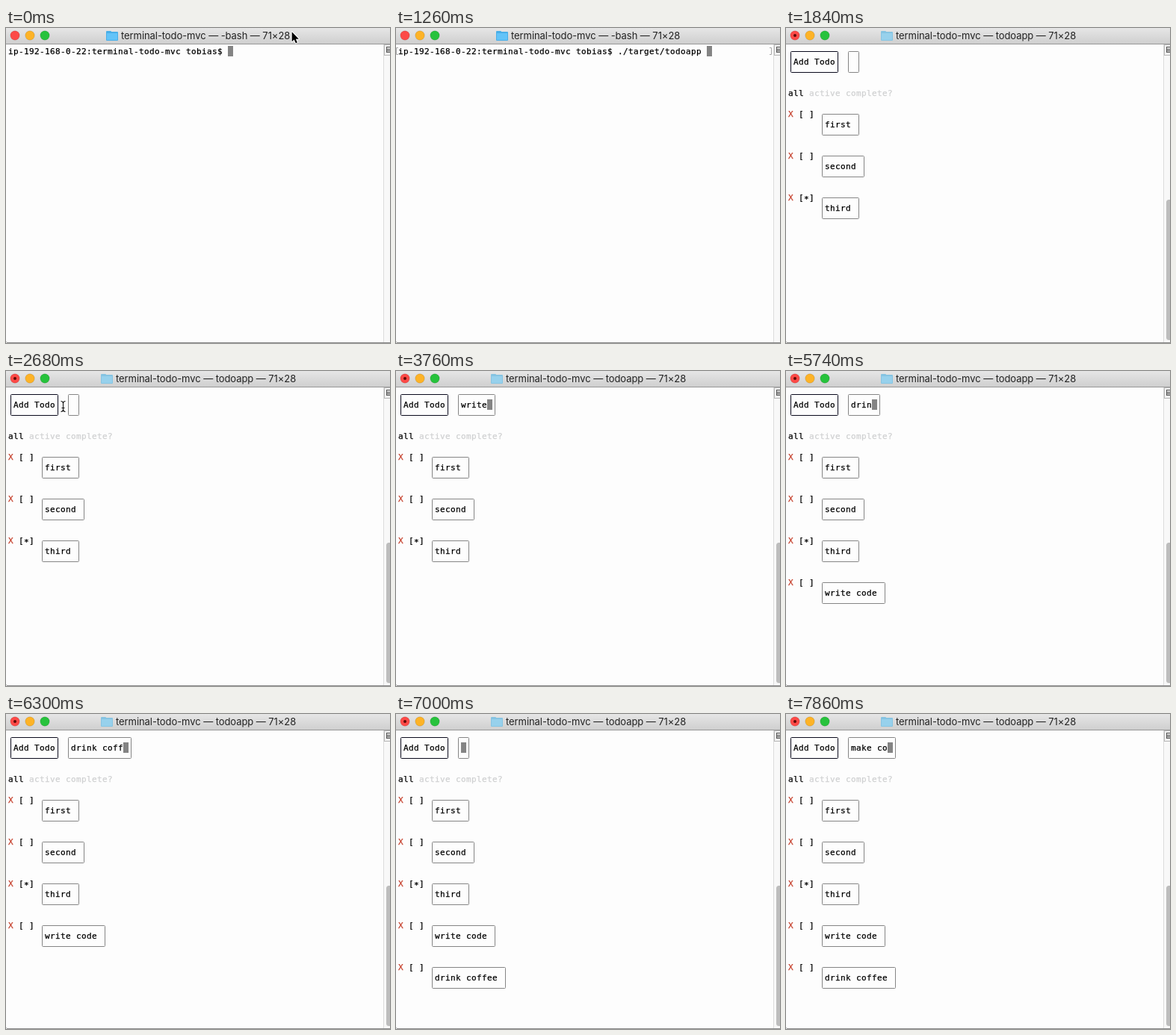
An HTML page with a canvas for the animation above (8 s loop, 514x422 px).

```html
<!DOCTYPE html>
<html lang="en">
<head>
<meta charset="utf-8">
<title>Terminal todo list</title>
<style>
html, body { margin: 0; width: 100%; height: 100%; overflow: hidden; background: #fdfdfd; }
canvas { display: block; width: 514px; height: 422px; }
</style>
</head>
<body>
<canvas id="stage" width="514" height="422"></canvas>
<script>
const ctx = document.getElementById('stage').getContext('2d');
const LOOP = 8000, CELL_W = 7, CELL_H = 14;
const MONO = '11px "DejaVu Sans Mono", monospace';
const PROMPT = 'ip-192-168-0-22:terminal-todo-mvc tobias$ ';
const COMMAND = './target/todoapp ';
const LAUNCH = 1660, DRAWN = 1700, FOCUS = 2940;

// Key times: a word finished by tab completion shares one time.
const commandKeys = [280, 340, 400, 450, 510, 560, 820, 820, 820,
  1100, 1160, 1200, 1260, 1260, 1260, 1260, 1260];
const entries = [
  { text: 'write code', done: 4600,
    keys: [3480, 3550, 3620, 3690, 3760, 3800, 3900, 4000, 4100, 4200] },
  { text: 'drink coffee', done: 6600,
    keys: [5460, 5540, 5640, 5740, 5860, 5880, 6020, 6100, 6160, 6300, 6320, 6460] },
  { text: 'make co', done: LOOP,
    keys: [7440, 7500, 7570, 7640, 7720, 7860, 7860] }
];

const typed = (text, keys, t) => text.slice(0, keys.filter(k => k <= t).length);
const colX = c => 3 + c * CELL_W;
const rowY = r => 24 + r * CELL_H;

function rect(x, y, w, h, color) {
  ctx.fillStyle = color;
  ctx.fillRect(x, y, w, h);
}

function dot(x, y, r, color) {
  ctx.fillStyle = color;
  ctx.beginPath();
  ctx.arc(x, y, r, 0, 7);
  ctx.fill();
}

function roundRect(x, y, w, h, r) {
  ctx.beginPath();
  ctx.roundRect(x, y, w, h, r);
}

// A hairline stroke gives the heavier glyphs of the terminal.
function print(text, col, row, color = '#000') {
  ctx.font = MONO;
  ctx.fillStyle = ctx.strokeStyle = color;
  ctx.lineWidth = 0.25;
  [...text].forEach((ch, i) => {
    const x = colX(col + i), y = rowY(row) + (ch === '*' ? 13 : 11);
    ctx.fillText(ch, x, y);
    ctx.strokeText(ch, x, y);
  });
}

function block(col, row) {
  rect(colX(col), rowY(row), CELL_W, CELL_H, '#848484');
}

// Box whose lines run through the middle of the character cells.
function box(col, row, inner, color) {
  ctx.strokeStyle = color;
  ctx.lineWidth = 1;
  roundRect(colX(col) + 3.5, rowY(row) + 7.5, (inner + 1) * CELL_W, 2 * CELL_H, 1);
  ctx.stroke();
}

function folder(x, color, edge) {
  ctx.fillStyle = edge;
  roundRect(x, 4, 7, 6, 1);
  ctx.fill();
  roundRect(x, 5, 16, 12, 1);
  ctx.fill();
  rect(x + 1, 7, 14, 9, color);
}

function titleBar(running) {
  const g = ctx.createLinearGradient(0, 0, 0, 21);
  g.addColorStop(0, '#e6e6e6');
  g.addColorStop(1, '#cfcfcf');
  rect(0, 0, 514, 21, g);
  rect(0, 21, 514, 1, '#989898');
  ['#fc4a47', '#fdb327', '#27c23c'].forEach((c, i) => {
    dot(12 + 20 * i, 10, 6.2, c);
    ctx.strokeStyle = 'rgba(0,0,0,.14)';
    ctx.lineWidth = 0.8;
    ctx.stroke();
  });
  if (running) dot(12, 10, 2, '#5c0a08');
  const x = running ? 127 : 134;
  if (running) folder(x, '#97d1ec', '#86c4e2');
  else folder(x, '#62c3f8', '#48aee8');
  ctx.font = '13px Inter, "Open Sans", sans-serif';
  ctx.letterSpacing = '-0.07px';
  ctx.fillStyle = '#222';
  ctx.fillText(`terminal-todo-mvc — ${running ? 'todoapp' : '-bash'} — 71×28`, x + 20, 15);
  ctx.letterSpacing = '0px';
}

function frame(running) {
  rect(505, 22, 9, 399, '#f8f8f8');
  rect(505, 22, 1, 399, '#dcdcdc');
  rect(506, 22, 8, 15, '#b8b8b8');
  rect(507, 23, 7, 13, '#f2f2f2');
  rect(509, 25, 5, 8, '#555');
  rect(510, 26, 4, 2, '#ddd');
  rect(510, 29, 4, 1, '#ddd');
  rect(510, 31, 4, 1, '#ddd');
  if (running) {
    ctx.fillStyle = '#bdbdbd';
    roundRect(509, 230, 8, 188, 3.5);
    ctx.fill();
  }
  rect(1, 421, 513, 1, '#8c8c8c');
  rect(0, 420, 1, 1, '#b0b0b0');
}

function shell(t) {
  const text = typed(COMMAND, commandKeys, t);
  print(PROMPT + text, 0, 0);
  block(PROMPT.length + text.length, 0);
  if (t >= 820) {
    ctx.strokeStyle = '#a8a8a8';
    ctx.lineWidth = 1;
    for (const [edge, end] of [[0.5, 3], [502.5, 500]]) {
      ctx.beginPath();
      ctx.moveTo(end, 26.5);
      ctx.lineTo(edge, 26.5);
      ctx.lineTo(edge, 35.5);
      ctx.lineTo(end, 35.5);
      ctx.stroke();
    }
  }
}

function todo(text, i, complete) {
  const row = 6 + 4 * i;
  print('X', 0, row, '#c23621');
  print(complete ? '[*]' : '[ ]', 2, row);
  box(6, row, text.length + 1, '#858585');
  print(text, 7, row + 1);
}

function app(t) {
  box(0, 0, 8, '#0a0a1c');
  print('Add Todo', 1, 1);
  const entry = entries.find(e => t < e.done);
  const text = typed(entry.text, entry.keys, t);
  box(11, 0, text.length + 1, '#858585');
  print(text, 12, 1);
  if (t >= FOCUS) block(12 + text.length, 1);
  print('all', 0, 4);
  print('active complete?', 4, 4, '#cfd0d1');
  const added = entries.filter(e => t >= e.done).map(e => e.text);
  ['first', 'second', 'third', ...added].forEach((s, i) => todo(s, i, i === 2));
}

function arrow(x, y) {
  const pts = [[0, 0], [0, 13], [3, 10.2], [5.1, 15], [7.2, 14.1], [5.2, 9.4], [9.2, 9.4]];
  ctx.beginPath();
  pts.forEach(([px, py]) => ctx.lineTo(x + px, y + py));
  ctx.closePath();
  ctx.lineJoin = 'round';
  ctx.strokeStyle = '#fff';
  ctx.lineWidth = 2;
  ctx.stroke();
  ctx.fillStyle = '#000';
  ctx.fill();
}

function beam(x, y) {
  ctx.beginPath();
  for (const s of [-1, 1]) {
    ctx.moveTo(x - 3, y + 7 * s);
    ctx.quadraticCurveTo(x, y + 7 * s, x, y + 4 * s);
    ctx.quadraticCurveTo(x, y + 7 * s, x + 3, y + 7 * s);
  }
  ctx.moveTo(x, y - 5);
  ctx.lineTo(x, y + 5);
  ctx.moveTo(x - 2, y + 2);
  ctx.lineTo(x + 2, y + 2);
  ctx.strokeStyle = '#fff';
  ctx.lineWidth = 2.5;
  ctx.stroke();
  ctx.strokeStyle = '#111';
  ctx.lineWidth = 1.1;
  ctx.stroke();
}

// Pointer stops: time, x, y.
const path = [[2120, 380, 6], [2660, 76.5, 47.5], [2720, 76.5, 47.5],
  [2820, 90, 46], [2940, 90, 46], [3200, 312, 58], [3480, 312, 58]];

function pointer(t) {
  if (t < 280) return arrow(382.7, 5.3);
  if (t < path[0][0] || t >= 3480) return;
  const i = path.findIndex(p => t < p[0]);
  const [t0, x0, y0] = path[i - 1], [t1, x1, y1] = path[i];
  const k = (t - t0) / (t1 - t0), e = k * k * (3 - 2 * k);
  const x = x0 + (x1 - x0) * e, y = y0 + (y1 - y0) * e;
  if (y < 22) arrow(x, y);
  else beam(x, y);
}

function draw(now) {
  const t = now % LOOP, running = t >= LAUNCH;
  rect(0, 0, 514, 422, '#fdfdfd');
  titleBar(running);
  frame(running);
  if (!running) shell(t);
  else if (t >= DRAWN) app(t);
  pointer(t);
}

let start;
function tick(now) {
  start ??= now;
  draw(now - start);
  requestAnimationFrame(tick);
}
requestAnimationFrame(tick);
</script>
</body>
</html>
```
